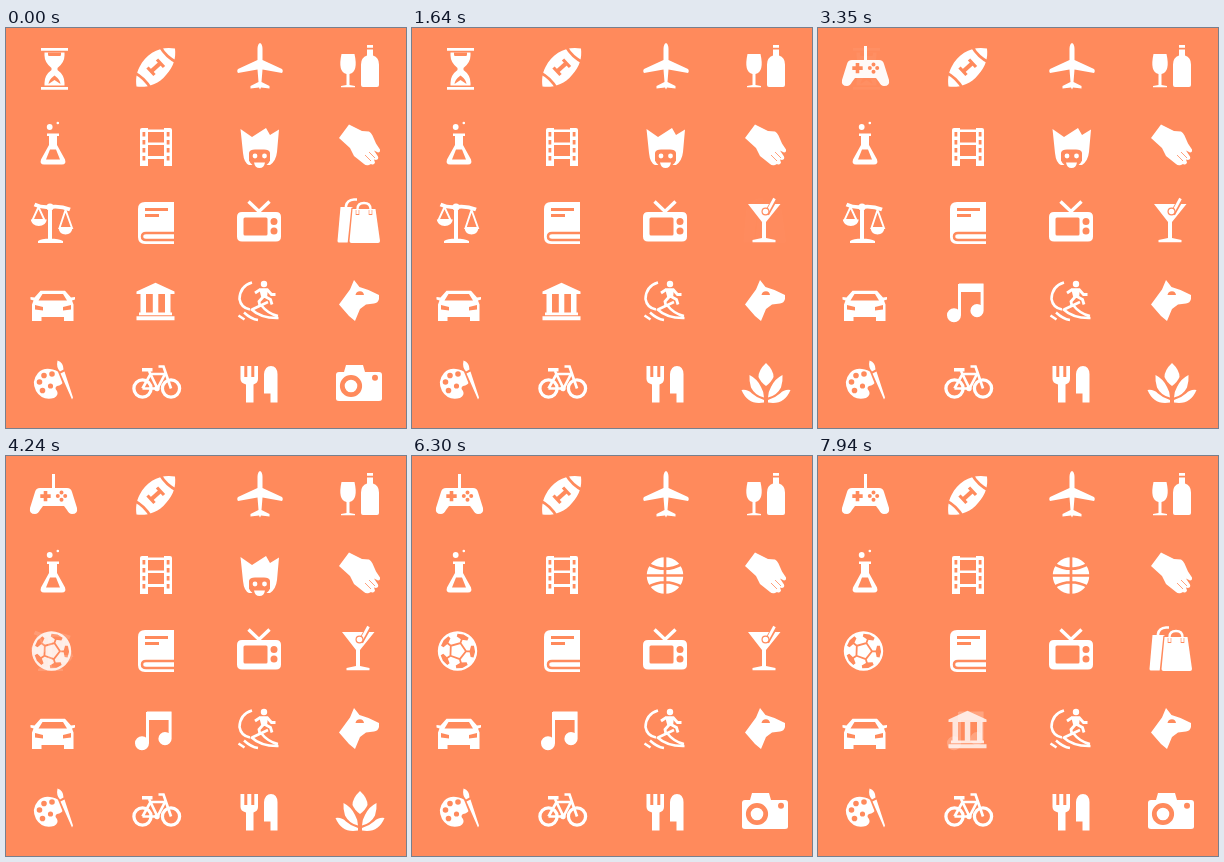
Recreate the animation shown at these times as an HTML page with a canvas. Size 400 by 400 pixels, loop 8 s.

```html
<!DOCTYPE html>
<html lang="en">
<head>
<meta charset="utf-8">
<title>Icon grid</title>
<style>
html, body { margin: 0; width: 100%; height: 100%; overflow: hidden; background: #ff8a5c; }
canvas { display: block; width: 400px; height: 400px; }
</style>
</head>
<body>
<canvas id="stage" width="400" height="400"></canvas>
<script>
const SIZE = 400, LOOP = 8000, STEP = 70;

// Path helpers
const dot = (x, y, r) => `M${x - r} ${y}a${r} ${r} 0 1 1 ${2 * r} 0a${r} ${r} 0 1 1 ${-2 * r} 0z`;
const box = (x, y, w, h) => `M${x} ${y}h${w}v${h}h${-w}z`;
const poly = (cx, cy, r, n, turn) => {
  let d = '';
  for (let i = 0; i < n; i++) {
    const a = turn + i * 2 * Math.PI / n;
    d += `${i ? 'L' : 'M'}${cx + r * Math.cos(a)} ${cy + r * Math.sin(a)}`;
  }
  return d + 'z';
};

// Layers: white fill, white line, cut-out fill, cut-out line
const fill = d => ({ d });
const line = (d, w) => ({ d, w });
const cut = d => ({ d, cut: true });
const groove = (d, w) => ({ d, w, cut: true });

function soccer() {
  const cx = 45.5, cy = 195, up = -Math.PI / 2 + 0.35;
  let seams = poly(cx, cy, 8.5, 5, up), patches = '';
  for (let i = 0; i < 5; i++) {
    const a = up + i * 2 * Math.PI / 5;
    const at = (r, da) => `${cx + r * Math.cos(a + da)} ${cy + r * Math.sin(a + da)}`;
    seams += `M${at(8.5, 0)}L${at(13, 0)}`;
    patches += `M${at(12, 0)}L${at(14.5, 0.4)}L${at(17.3, 0.35)}L${at(17.6, 0)}L${at(17.3, -0.35)}L${at(14.5, -0.4)}z`;
  }
  return [fill(dot(cx, cy, 19.7)), cut(patches), groove(seams, 1.8)];
}

function film() {
  let holes = '';
  for (let i = 0; i < 4; i++) holes += box(136.5, 104 + i * 8, 2.8, 4.5) + box(160.7, 104 + i * 8, 2.8, 4.5);
  return [
    fill('M136 100h28q2 0 2 2v36h-32v-36q0-2 2-2z'),
    cut(holes + box(142, 100, 16, 1.5) + box(142, 104, 16, 10.5) + box(142, 117, 16, 11) + box(142, 131, 16, 7))];
}

const icons = {
  hourglass: [
    fill(box(35, 20, 27, 2.8) + box(35, 59, 27, 2.8)),
    fill('M38.5 24.5h20v3q0 7-7 12.5v2q7 5 7 13v2.5h-20v-2.5q0-8 7-13v-2q-7-5.5-7-12.5z'),
    cut('M42 24.5h13v2l-.5 1.5h-12l-.5-1.5zM48.5 47.5q5.5 4 6 8.5l-6-4-6 4q.5-4.5 6-8.5z')],
  football: [
    fill('M169 20.5C155 18 141 24 133.5 39C130 46 129.7 52 130.5 58.5C140 60 152 57 160 47C168 38 170 30 169 20.5z'),
    groove('M154 18.500Q160 29 171 34.5M128 44.5Q139 50 145 61'.replace('.500', '.5'), 2.7),
    groove('M145 43.5L154.5 35', 4.3),
    groove('M141.5 39.5l7 7.5M151 31.5l7 7.5', 3.2)],
  plane: [fill('M253.5 15c2 0 3 3 3 6v11l19.5 9c1 1 1 3 0 4l-19.5-3.5-1 12.5 8 4v2.5l-8.5-1-1 2-1-2-8.5 1v-2.5l8-4-1-12.5-19.5 3.500c-1-1-1-3 0-4l19.5-9V21c0-3 1-6 3-6z')],
  wine: [
    fill('M335.5 26h13q4 18-5 20v11l5.5 1v1.2h-14v-1.2l5.5-1v-11q-9-2-5-20z'),
    fill(box(361, 17, 6, 2.8) + 'M361 21.5h6v6q6 2 6 9v20.500q0 2-2 2h-14q-2 0-2-2v-20.5q0-7 6-9z')],
  flask: [
    fill(dot(43.7, 99, 2.9) + dot(51.8, 95, 1.3)),
    fill('M41 105.5h12v2.500h-2v9l8 14.5q1.5 5-3 5h-18q-4.5 0-3-5l8-14.5v-9h-2z'),
    cut('M44 121.5h6l4 10h-14z')],
  film: film(),
  mask: [
    fill('M234.5 101L246 109L260 100L264 107L273 101.5L271 124Q270 133 264 137H243Q238 135 237 125z'),
    cut('M243 124.5q1-3 6-3h9q5 0 6 3v8q-1 3-4 5h-13q-3-2-4-5z'),
    fill(dot(249, 128, 2.4) + dot(258.5, 128, 2.4) + 'M248 134.5h11q-1 5.5-5.500 5.5t-5.5-5.5z')],
  hand: [
    fill('M343 96.5l13 6.500 7 .5q2 1 3.5 4l3.500 8 4 6q.5 3-2 3l-4-2 4 6q1 3-2 3.5l-2-.5 1 3q-1 3-4 1.500l-2 1q-3 1-5-1l-10-8-4-8-11-10z'),
    groove('M359 127l6 6M363 124l6 6', .8)],
  scales: [
    fill(box(42, 178, 4, 33) + dot(44, 179, 3.6) + 'M32 215v-2q3-2.5 12-2.5t13 2.5v2z'),
    line('M28.5 176.5Q36 180 44 179Q54 177.5 64 181.5', 3.8),
    line('M32.5 179l-6 13h12zM59.500 182l-6 18h12.5z', 1.9),
    fill('M24.8 191.5h16q-1 6.5-8 6.5t-8-6.5zM52.5 200h14q-1 6.5-7 6.5t-7-6.5z')],
  book: [
    fill('M139 174h29v42h-29q-7 0-7-7v-28q0-7 7-7z'),
    cut(box(139, 180, 23, 3) + box(139, 186, 14, 3)),
    groove('M169 205h-29q-4 0-4 3.5t4 3.5h29', 2.5)],
  tv: [
    fill('M236 184h34q5 0 5 5v19.5q0 5-5 5h-34q-5 0-5-5v-19.5q0-5 5-5z'),
    cut('M239 189.5h21q1.5 0 1.5 1.5v15q0 1.5-1.500 1.5h-21q-1.5 0-1.5-1.5v-15q0-1.5 1.5-1.5z' + dot(268, 193.5, 3.5) + dot(268, 203, 3.5)),
    line('M242.5 173.5l10.5 10 10.5-10', 3.4)],
  bags: [
    fill('M334.5 179h12l-2.5 35.5h-11q-1.5 0-1.5-1.5z'),
    line('M340 183v-5q1-6 8-6.5h3', 2.6),
    groove('M346.5 181h23l5 33h-31.5z', 2.5),
    fill('M346.5 181h23l4.5 32q0 2-2 2h-26.5q-2 0-2-2z'),
    groove('M351.5 187v-5M364.5 187v-5', 3.6),
    line('M351.5 186v-5q0-6 6.5-6t6.5 6v5', 2.3)],
  cocktail: [
    fill('M336 176h32.5l-14.5 18v16l9.5 2v2.3h-23v-2.3l9.5-2v-16z'),
    groove('M354.5 186L364 169', 5.5),
    line('M356 182.5L362.5 170.5', 2.8),
    cut(dot(353.5, 183.5, 4)), fill(dot(353.5, 183.5, 2.8))],
  car: [
    fill('M34.5 262.8h24.500l6 6.7 4-.5v2.5l-3 1 1.500 4v16.5h-9.5v-4h-22.5v4h-9.5v-16.5l1.5-4-3-1v-2.5l4 .5z'),
    cut('M36.5 266h20.5l4 6.500h-28.5zM29 277l8 2v3.500l-8-1zM65 277l-8 2v3.5l8-1z')],
  bank: [fill('M149.5 254.8l19 8.700v2.5h-38v-2.5z' + box(134.5, 265.5, 5.5, 19) + box(146.8, 265.5, 5.5, 19) +
    box(159, 265.5, 5.5, 19) + box(133, 284.5, 33, 2.7) + box(130.5, 288.3, 38, 3.9))],
  music: [fill(box(141, 255.5, 24.5, 8.5) + box(140, 256, 3, 31) + box(162.6, 256, 3, 27) +
    dot(136, 287.2, 7) + dot(159, 282.7, 6.6))],
  surfer: [
    line('M246 254.5Q234 258 233.5 271Q235 280 244 281.5', 2.6),
    fill(dot(258, 256, 3.2)),
    fill('M253 260.5h9l-1 9.5h-5.5z'),
    line('M249 265l4.5-3h8l4 4.500h4M257 269l-4 4.500 1 5M259 268.500l5.5 3 1.5 5', 2.8),
    line('M246 281.5L262 274M232.5 287.5l6 4M238 284.5q7 6.5 14 7.500M245 281q10 9.5 27.5 9M255 277q7 9 17 11', 2.5)],
  dog: [
    fill('M348 252l5.500 7 9 3 10.500 5v4q-1 4-5 4.500l-8 1-6 4.5-5 12-6-5-10-11.500 11-15z'),
    cut('M349.5 267q.5-3.800 4.5-3.800 3.500 0 4 3.800z')],
  palette: [
    fill('M44 341q12 1 13 13-1 3-6 4-3 2 0 5 2 4-3 7-12 3-18-7-5-10 2-18 5-5 12-4z'),
    cut(dot(33.5, 354, 2.8) + dot(38, 347.5, 2.8) + dot(46, 346, 2.8) + dot(36.5, 362.5, 2.8) + dot(44.5, 358, 2.6)),
    groove('M54.5 342L66 371', 6),
    fill('M51.5 332.500q6 2 6 9l-3.5 2q-4-4-2.5-11zM54.5 345.5l4-2 8.5 26-1 2z')],
  bike: [
    line(dot(136.500, 360.5, 8.6) + dot(165, 360.5, 8.6), 3.3),
    line('M136.5 360.5l8-14.5h14M143 343l8.5 17.5 7.5-14.5M136.5 360.5h15M165 360.5l-7.5-22h-5', 2.7),
    fill(box(136, 340, 10.5, 3.4) + dot(151, 360.5, 2.7))],
  cutlery: [
    fill('M234.5 338h3.8v11h3v-11h4v11h3v-11h3.7v13q0 4-4.5 5.5v18h-7.500v-18q-5.5-1.5-5.5-5.5z'),
    fill('M258 346q1-8 7-8 6 0 6.5 8v28.500h-7v-9h-6.5z')],
  camera: [
    fill('M333 344h5l2-7h17l2 7h14q3 0 3 3v23.5q0 2.5-3 2.5h-40q-3 0-3-2.5v-23.5q0-3 3-3z'),
    groove(dot(345, 358, 8.7), 4.8), cut(dot(369, 349.8, 3))],
  lotus: [
    fill('M354 335q7.5 7 7.5 14-2 5-7.5 9-5.500-4-7.5-9 0-7 7.5-14z'),
    fill('M337.500 347q8 4 11.5 12 3 5 3 10.5-9-2-13-10-2-6-1.5-12.5zM370.5 347q-8 4-11.5 12-3 5-3 10.5 9-2 13-10 2-6 1.5-12.5z'),
    fill('M329.5 362q6-1 10.5 3.5 5 4.5 12 6.500v2.5q-16 3-22.5-12.5zM378.500 362q-6-1-10.5 3.5-5 4.5-12 6.5v2.5q16 3 22.5-12.5z')],
  gamepad: [
    fill(box(46, 18, 3, 15)),
    fill('M34 32h27q4 0 5 4l5 16q1 6-5 6-3 0-5-4l-3-4h-21l-3 4q-2 4-5 4-6 0-5-6l5-16q1-4 5-4z'),
    cut(box(34.3, 38.3, 10.4, 3.6) + box(37.7, 34.9, 3.6, 10.4)),
    cut(dot(55.5, 36.4, 2) + dot(55.5, 43.8, 2) + dot(51.8, 40.1, 2) + dot(59.2, 40.1, 2))],
  soccer: soccer(),
  basketball: [
    fill(dot(253, 119.5, 18.3)),
    groove('M253 100v40M234 119.5h38M236 108q17 9.5 34 0M236 131q17-9.5 34 0', 2.7)],
};

const still = ['football', 'plane', 'wine', 'flask', 'film', 'hand', 'book', 'tv',
  'car', 'surfer', 'dog', 'palette', 'bike', 'cutlery'];

// from, to, start, first level, gain per step, steps, done, faint lead-in
const fades = [
  ['camera', 'lotus', 400, .15, .14, 7, 1220],
  ['bags', 'cocktail', 1220, .15, .14, 7, 2040],
  ['bank', 'music', 2040, .15, .14, 7, 2460],
  ['hourglass', 'gamepad', 2930, .24, .12, 7, 3750],
  ['scales', 'soccer', 3820, .1, .125, 8, 4380],
  ['mask', 'basketball', 4780, .15, .122, 8, 5270, 4380],
  ['lotus', 'camera', 5740, .16, .11, 8, 6300, 5340],
  ['cocktail', 'bags', 6770, .22, .135, 7, 7190, 6370],
  ['music', 'bank', 7590, .15, .126, 6, LOOP],
];

function render(layers) {
  const c = document.createElement('canvas');
  c.width = c.height = SIZE;
  const g = c.getContext('2d');
  g.fillStyle = g.strokeStyle = '#fff';
  for (const { d, w, cut } of layers) {
    g.globalCompositeOperation = cut ? 'destination-out' : 'source-over';
    const path = new Path2D(d);
    if (w) { g.lineWidth = w; g.stroke(path); } else g.fill(path);
  }
  return c;
}

const art = {};
for (const name in icons) art[name] = render(icons[name]);

function level([, , start, first, gain, steps, done, lead = start], t) {
  if (t >= done) return 1;
  if (t < start) return t >= lead ? .04 : 0;
  const k = Math.min(Math.floor((t - start) / STEP), steps - 1);
  return Math.min(1, first + gain * k);
}

const ctx = document.getElementById('stage').getContext('2d');

function draw(t) {
  const alpha = {};
  for (const name of still) alpha[name] = 1;
  for (const fade of fades) {
    const [from, to] = fade, p = level(fade, t);
    if (p > 0 || !(from in alpha)) {
      alpha[from] = 1 - p;
      alpha[to] = p;
    }
  }
  ctx.globalAlpha = 1;
  ctx.fillStyle = '#ff8a5c';
  ctx.fillRect(0, 0, SIZE, SIZE);
  for (const name in alpha) {
    ctx.globalAlpha = alpha[name];
    ctx.drawImage(art[name], 0, 0);
  }
}

const begin = performance.now();
function tick() {
  draw((performance.now() - begin) % LOOP);
  requestAnimationFrame(tick);
}
tick();
</script>
</body>
</html>
```
